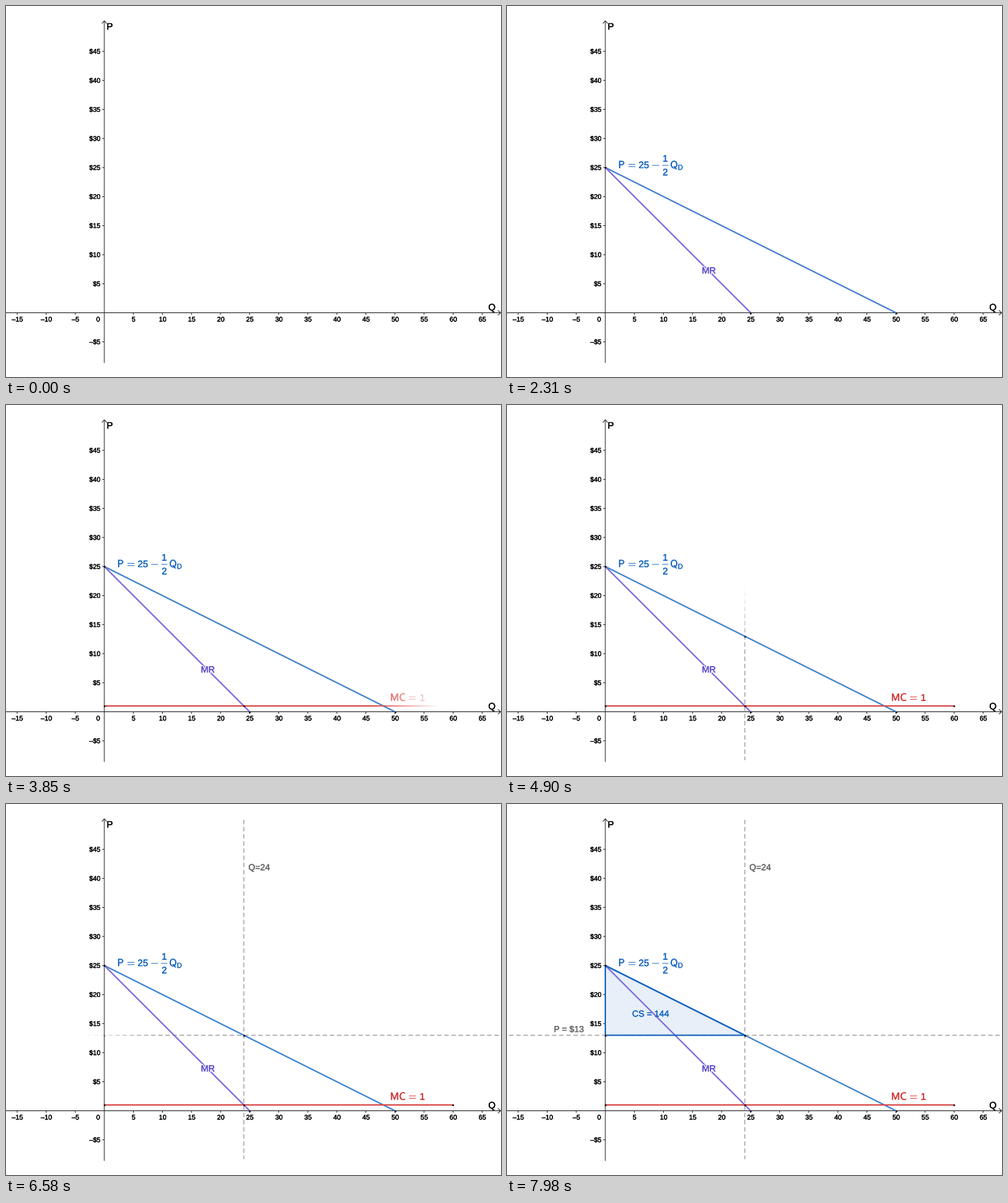
Animation of 720x540 px, one loop 8000 ms. Source, as a matplotlib script:

```python
import numpy as np
import matplotlib.pyplot as plt
from matplotlib.animation import FuncAnimation
from matplotlib.patheffects import withStroke

W, H = 720, 540
INTERVAL, FRAMES = 40, 200
STEP = 70            # ms between picture changes
SOFT = 100           # width of the soft wipe edge
UNIT = 8.455         # pixels per axis unit
X0, Y0 = 143, 446.5  # origin of the chart

BLACK, GREY, DASH = "#000000", "#666666", "#9a9a9a"
AXIS = "#222222"
BLUE, PALE_BLUE = "#1565c0", "#3c7fcc"
PURPLE, PALE_PURPLE = "#6557d2", "#7c68da"
RED, PALE_RED = "#d32f2f", "#dc4a4a"

plt.rcParams.update({
    "font.family": "Liberation Sans",
    "text.hinting": "none",
    "toolbar": "None",
})
fig = plt.figure(figsize=(W / 72, H / 72), dpi=72, facecolor="white")
ax = fig.add_axes([0, 0, 1, 1])
ax.set(xlim=(0, W), ylim=(H, 0))
ax.axis("off")


def px(q):
    return X0 + UNIT * q


def py(p):
    return Y0 - UNIT * p


def line(xs, ys, color, width=2.0, z=3, **kw):
    kw.setdefault("solid_capstyle", "butt")
    return ax.plot(xs, ys, color=color, lw=width, ms=2.6, zorder=z,
                   snap=False, **kw)[0]


def segment(a, b, color, width=2.0, z=3):
    return line([px(a[0]), px(b[0])], [py(a[1]), py(b[1])], color, width, z)


def dots(*points):
    return ax.plot([px(q) for q, _ in points], [py(p) for _, p in points],
                   "o", color=BLACK, ms=2.6, mew=0, zorder=8, snap=False)[0]


def label(s, x, y, size, color=BLACK, ha="left", halo=0, **kw):
    # Stroked outlines keep sub-pixel positions and add a little weight.
    effects = [withStroke(linewidth=0.3, foreground=color)]
    if halo:
        effects.insert(0, withStroke(linewidth=halo, foreground="white"))
    return ax.text(x, y, s, size=size, color=color, ha=ha, va="baseline",
                   zorder=7, path_effects=effects, **kw)


def letters(s, x, y, color, size=15):
    return label(rf"$\mathsf{{{s}}}$", x, y, size, color, "center",
                 math_fontfamily="cm")


def digits(s, x, y, color):
    return label(s, x, y, 13.8, color, "center")


def bar(x, y, width, color):
    return line([x - width / 2, x + width / 2], [y, y], color, 0.9, 7)


def equals(x, baseline, color):
    return [bar(x, baseline - rise, 10, color) for rise in (5.6, 2.2)]


def draw_axes():
    line([0, 719], [Y0, Y0], AXIS, 1, 1)
    line([X0, X0], [22, 519.5], AXIS, 1, 1)
    line([X0 - 3.5, X0, X0 + 3.5], [25.5, 21.5, 25.5], AXIS, 1, 1)
    line([715.5, 719.5, 715.5], [Y0 - 3.5, Y0, Y0 + 3.5], AXIS, 1, 1)
    for q in range(-15, 70, 5):
        if q:
            line([px(q)] * 2, [Y0, Y0 + 3], AXIS, 1, 1)
            label(str(q).replace("-", "–"), px(q) + 0.3, 459.3, 9.8,
                  ha="center")
    for p in range(-5, 50, 5):
        if p:
            line([X0 - 3, X0], [py(p)] * 2, AXIS, 1, 1)
            label(f"${p}".replace("$-", "–$").replace("$", r"\$"), 137.3,
                  py(p) + 3.4, 9.8, ha="right")
    label("0", 134, 459.3, 9.8, ha="center")
    label("P", 146.5, 34.3, 13.5)
    label("Q", 701.5, 443, 13.5)


class Wipe:
    """Reveals artists with a soft edge that moves along one direction."""

    def __init__(self, artists, begin, steps, edge, first, speed=54,
                 direction=1, vertical=False):
        self.artists = artists
        self.begin, self.steps = begin, steps
        self.edge, self.first, self.speed = edge, first, speed
        self.direction, self.vertical = direction, vertical

    def soft_mask(self, artist, front):
        box = artist.get_window_extent()
        corner = max(0, H - box.y1 if self.vertical else box.x0)

        def apply(image, dpi):
            count = image.shape[0 if self.vertical else 1]
            travel = self.direction * (corner + np.arange(count) - self.edge)
            alpha = np.clip((front - travel) / SOFT, 0, 1)
            image = image.copy()
            image[..., 3] *= alpha[:, None] if self.vertical else alpha
            return image, 0, 0

        return apply

    def update(self, t):
        n = (t - self.begin) // STEP + 1
        front = self.first + (n - 1) * self.speed
        for artist in self.artists:
            artist.set_visible(n >= 1)
            moving = 1 <= n < self.steps
            artist.set_agg_filter(
                self.soft_mask(artist, front) if moving else None)


draw_axes()

demand = [
    segment((0, 25), (50, 0), PALE_BLUE),
    dots((0, 25), (50, 0)),
    letters("P", 167, 236, BLUE),
    *equals(181.8, 236, BLUE),
    digits("25", 199, 236, BLUE),
    bar(216.2, 232, 10, BLUE),
    digits("1", 230.2, 226.5, BLUE),
    bar(230.2, 232, 9, BLUE),
    digits("2", 230.2, 246.5, BLUE),
    letters("Q", 243.5, 236, BLUE),
    letters("D", 252.8, 238.5, BLUE, 10.5),
]

marginal_revenue = [
    segment((0, 25), (25, 0), PALE_PURPLE),
    dots((25, 0)),
    label("MR", 283.5, 389.3, 13, PURPLE, halo=3),
]

marginal_cost = [
    segment((0, 1), (60, 1), PALE_RED),
    dots((0, 1), (24, 1), (60, 1)),
    letters("MC", 570.5, 430.5, RED),
    *equals(591.3, 430.5, RED),
    digits("1", 605.5, 430.5, RED),
]

dash = dict(dashes=(5, 3), dash_capstyle="butt")
quantity = [
    line([px(24)] * 2, [23, 517], DASH, 1.3, 2, **dash),
    dots((24, 13)),
    label("Q=24", 352.5, 96.4, 12.7, GREY),
]

price = [
    line([3, W], [py(13)] * 2, DASH, 1.3, 2, **dash),
    dots((0, 13)),
    label(r"P = \$13", 68, 332, 12.7, GREY),
]

corners = [(0, 25), (24, 13), (0, 13)]
surplus = [
    ax.fill([px(q) for q, _ in corners], [py(p) for _, p in corners],
            color=BLUE, alpha=0.1, lw=0, zorder=2)[0],
    *[segment(a, b, BLUE, 2, 5)
      for a, b in zip(corners, corners[1:] + corners[:1])],
    label("CS = 144", 182, 309.5, 12.8, BLUE),
]

wipes = [
    Wipe(demand, 560, 10, 141, 40),
    Wipe(marginal_revenue, 1960, 6, 141, 44),
    Wipe(marginal_cost, 3290, 12, 141, 57),
    Wipe(quantity, 4480, 15, 516, 10, 41, direction=-1, vertical=True),
    Wipe(price, 5880, 14, W, 57, 55, direction=-1),
    Wipe(surplus, 7490, 7, 141, 26),
]


def draw(frame):
    t = frame * INTERVAL + 30
    for wipe in wipes:
        wipe.update(t)
    return []


anim = FuncAnimation(fig, draw, frames=FRAMES, interval=INTERVAL,
                     init_func=lambda: draw(0), repeat=True, repeat_delay=0,
                     blit=False)
plt.show()
```
